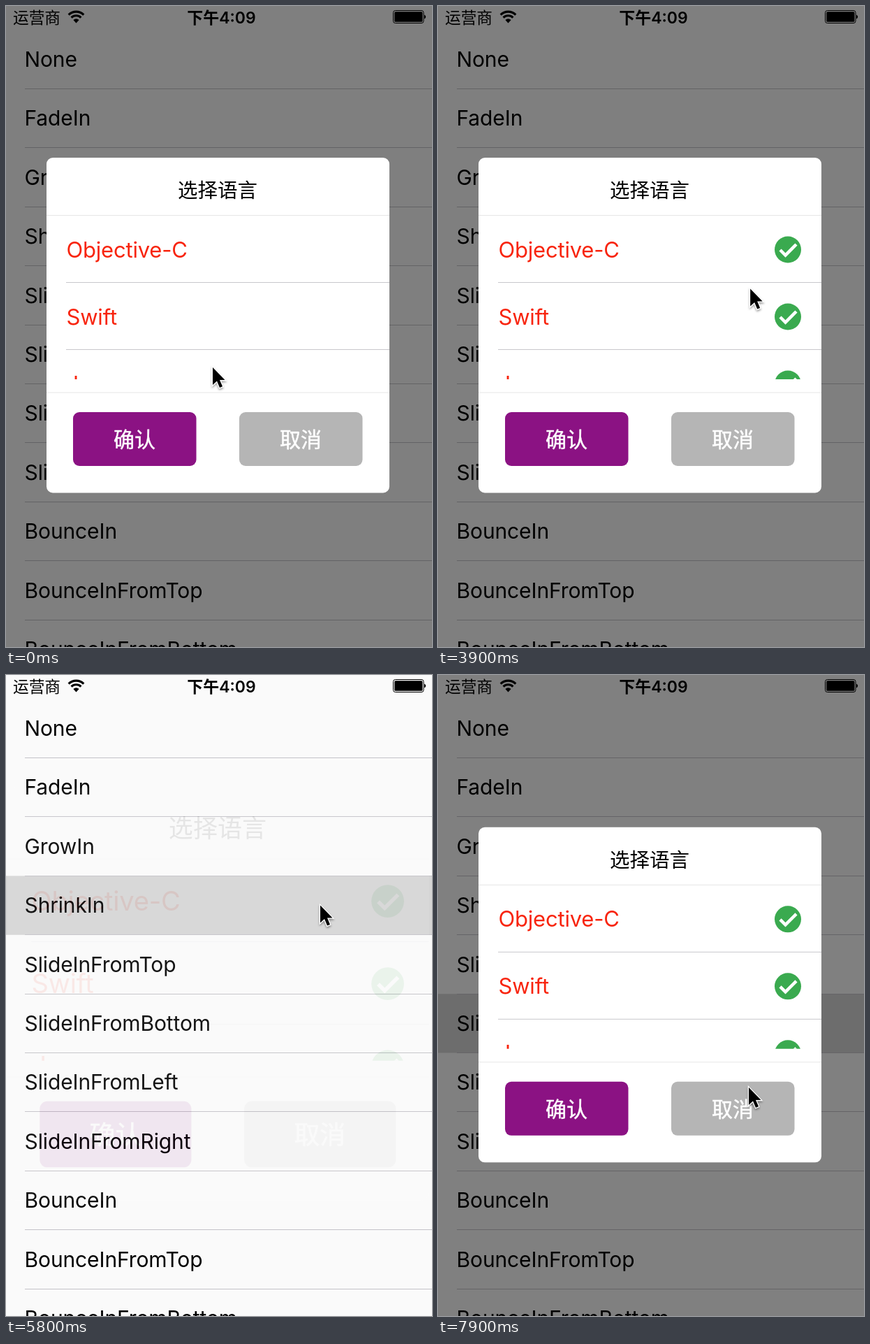
An HTML page that plays this animation: 610 by 917 pixels, repeating every 8000 ms.

```html
<!DOCTYPE html>
<html lang="zh-CN">
<head>
<meta charset="utf-8">
<title>选择语言</title>
<style>
  html, body { margin: 0; width: 100%; height: 100%; overflow: hidden; background: #fff; }
  svg { display: block; width: 610px; height: 917px; }
  text { font-family: Inter, "Noto Sans CJK SC", "Noto Sans CJK", sans-serif; }
  .item { font-size: 30px; letter-spacing: -.12px; }
  .option { font-size: 31px; letter-spacing: -.2px; fill: #f8240d; }
  .mid { text-anchor: middle; }
  .line { stroke: #c8c7cc; }
  .rule { stroke: #e6e6e6; }
  .button { font-size: 30px; font-weight: 500; fill: #fff; stroke: #fff; stroke-width: .5; }
  .alert { font-size: 32px; font-weight: 600; }
</style>
</head>
<body>
<svg viewBox="0 0 610 917">
  <defs>
    <clipPath id="viewport"><rect x="58" y="300" width="491" height="234"/></clipPath>
    <filter id="shadow" x="-50%" y="-50%" width="200%" height="200%">
      <feDropShadow dx="0" dy="2" stdDeviation="1.5" flood-opacity=".4"/>
    </filter>
  </defs>
  <rect width="610" height="917" fill="#fff"/>
  <rect id="highlight" width="610" height="84.4" fill="#d9d9d9"/>
  <g id="list"></g>
  <rect id="dim" width="610" height="917"/>

  <g id="dialog">
    <rect x="58" y="217" width="491" height="479.5" rx="9" fill="#fff"/>
    <text class="mid" x="303" y="274" font-size="28.5">选择语言</text>
    <path class="rule" d="M58 299.5H549M58 553H549"/>
    <g clip-path="url(#viewport)"><g id="options"></g></g>
    <rect x="96" y="581" width="176.5" height="77" rx="9" fill="#8b1283"/>
    <rect x="334" y="581" width="176.5" height="77" rx="9" fill="#b5b5b5"/>
    <text class="mid button" x="184" y="631">确认</text>
    <text class="mid button" x="422" y="631">取消</text>
  </g>

  <rect id="glow" x="46" y="336" width="518" height="241" rx="24" fill="#fff" style="mix-blend-mode:overlay"/>
  <rect id="panel" x="46" y="336" width="518" height="241" rx="24" fill="#fbfbfb"/>
  <g id="alert" class="mid alert">
    <path d="M46 493H564" stroke="#d5d5d8"/>
    <text x="305" y="405">您选中了:Objective-</text>
    <text x="305" y="448">C,Swift,Java,</text>
    <text x="305" y="548" fill="#007aff" font-weight="400">确定</text>
  </g>

  <g id="status">
    <text x="10" y="24.5" font-size="22.7">运营商</text>
    <g fill="none" stroke="#000" stroke-width="3.2">
      <path d="M89.7 12.6A15.4 15.4 0 0 1 111.3 12.6M93.6 16.6A9.8 9.8 0 0 1 107.4 16.6"/>
      <path d="M100.5 24.5L96.4 19.9A5.8 5.8 0 0 1 104.6 19.9Z" fill="#000" stroke="none"/>
    </g>
    <text class="mid" x="308.5" y="24.5" font-size="23" font-weight="600">下午4:09</text>
    <rect x="554.5" y="6.5" width="43.5" height="18" rx="3" fill="none" stroke="#000"/>
    <rect x="556.2" y="8.2" width="40.2" height="14.6" rx="1.5"/>
    <path d="M599 12.5A3.2 3.2 0 0 1 599 18.5Z"/>
  </g>
  <path id="cursor" d="M0 0V25L6 19.5L10 29L14 27.3L10 18H17.5Z"
    stroke="#fff" stroke-width="2.4" paint-order="stroke" filter="url(#shadow)"/>
</svg>
<script>
const LOOP = 8000, STEP = 100;
const FADE = 250, TRAVEL = 220;
const CENTER_X = 303.2, CENTER_Y = 456.7;
const ROW_TOP = 34.2, ROW_HEIGHT = 84.4, OPTION_HEIGHT = 96;

const SIDES = ['Top', 'Bottom', 'Left', 'Right'];
const ITEMS = ['None', 'FadeIn', 'GrowIn', 'ShrinkIn', ...SIDES.map(side => 'SlideInFrom' + side),
  'BounceIn', ...SIDES.slice(0, 2).map(side => 'BounceInFrom' + side)];
const OPTIONS = ['Objective-C', 'Swift', 'Java'];

// Hidden pose of each effect; every dialog opens and closes through it.
const EFFECTS = {
  FadeIn: {}, GrowIn: { scale: .8 }, ShrinkIn: { scale: 1 / .8 },
  SlideInFromTop: { slide: -700 }, SlideInFromBottom: { slide: 700 }
};
const INTRO = { effect: 'FadeIn', start: -1000, end: 2010 };
const DIALOGS = [
  INTRO,
  { effect: 'FadeIn', start: 3450, end: 4180 },
  { effect: 'GrowIn', start: 4532, end: 5360 },
  { effect: 'ShrinkIn', start: 5757, end: 6330 },
  { effect: 'SlideInFromTop', start: 6690, end: 7180 },
  { effect: 'SlideInFromBottom', start: 7655, end: 8080 }
];
const ALERT = { start: 2180, end: 2638 };

const checkTime = i => 400 + 350 * i;
const rowY = effect => ROW_TOP + ITEMS.indexOf(effect) * ROW_HEIGHT;
const pressTime = dialog => dialog.start - 100;

// The pointer reaches each spot a short rest before it clicks there.
const CLICKS = [
  ...OPTIONS.map((_, i) => ({ at: checkTime(i), rest: 40, x: 350, y: Math.min(385 + OPTION_HEIGHT * i, 458) })),
  { at: INTRO.end, rest: 180, x: 213, y: 598 },
  { at: ALERT.end, rest: 180, x: 276, y: 537 },
  ...DIALOGS.slice(1).flatMap(dialog => [
    { at: pressTime(dialog), rest: 40, x: 450, y: rowY(dialog.effect) + ROW_HEIGHT / 2 },
    { at: dialog.end, rest: 180, x: 445, y: 590 }
  ])
];

const $ = id => document.getElementById(id);
const set = (id, name, value) => $(id).setAttribute(name, value);
const mix = (a, b, p) => a + (b - a) * p;
const smooth = x => { x = Math.min(1, Math.max(0, x)); return x * x * (3 - 2 * x); };
const presence = ({ start, end }, t) => smooth((t - start) / FADE) - smooth((t - end) / FADE);

$('list').innerHTML = ITEMS.map((name, i) => {
  const y = i * ROW_HEIGHT;
  return `<text class="item" x="26.5" y="${87 + y}">${name}</text>
    <path class="line" d="M27 ${Math.round(118 + y) + .5}H610"/>`;
}).join('');

$('options').innerHTML = OPTIONS.map((name, i) =>
  `<g transform="translate(0 ${i * OPTION_HEIGHT})">
    <text class="option" x="86.5" y="359.5">${name}</text>
    <g id="check${i}">
      <circle cx="501" cy="348.5" r="19" fill="#3aaa4f"/>
      <path d="M490 349L497.5 356.5L513 341" fill="none" stroke="#fff" stroke-width="4.5"/>
    </g>
    <path class="line" d="M86 395.5H549"/>
  </g>`).join('');

function pointerAt(t) {
  return CLICKS.reduce(([px, py], { at, rest, x, y }) => {
    const p = smooth((t - at + rest) / TRAVEL + 1);
    return [mix(px, x, p), mix(py, y, p)];
  }, [296, 517]);
}

function draw(t) {
  const dialog = DIALOGS.findLast(d => t >= d.start);
  const { scale = 1, slide = 0 } = EFFECTS[dialog.effect];
  const shown = presence(dialog, t);
  const alert = presence(ALERT, t);

  const pressed = DIALOGS.find(d => t >= pressTime(d) && t < d.start + 350);
  set('highlight', 'opacity', pressed ? 1 : 0);
  if (pressed) set('highlight', 'y', rowY(pressed.effect));
  set('dim', 'opacity', Math.max(.5 * shown ** (slide ? 1.8 : 1.3), .4 * alert ** 1.6));

  set('dialog', 'opacity', slide ? Math.ceil(shown) : shown);
  set('dialog', 'transform', `translate(${CENTER_X} ${CENTER_Y + mix(slide, 0, shown)})
    scale(${mix(scale, 1, shown)}) translate(${-CENTER_X} ${-CENTER_Y})`);
  const scroll = dialog === INTRO ? 73 * smooth((t - 770) / 300) : 0;
  set('options', 'transform', `translate(0 ${-scroll})`);
  OPTIONS.forEach((_, i) => set('check' + i, 'opacity', t >= checkTime(i) ? 1 : 0));

  set('glow', 'opacity', Math.sqrt(alert));
  set('panel', 'opacity', .97 * alert ** 1.6);
  set('alert', 'opacity', alert);
  set('cursor', 'transform', `translate(${pointerAt(t)})`);
}

function frame() {
  draw(Math.floor(performance.now() % LOOP / STEP) * STEP);
  requestAnimationFrame(frame);
}
frame();
</script>
</body>
</html>
```
